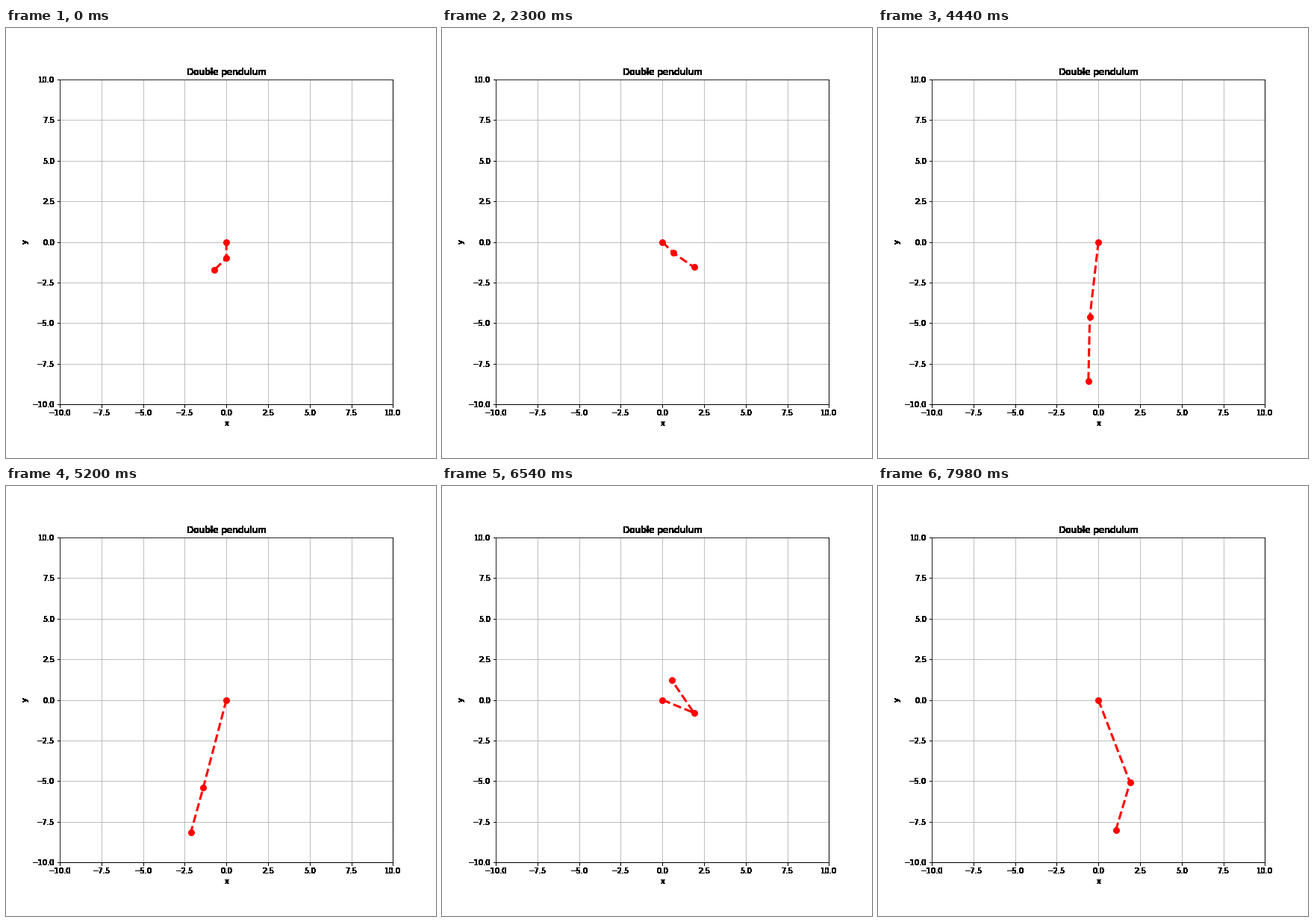
A matplotlib script that plays this animation: 576 by 576 pixels, repeating every 8000 ms.

```python
import math

import matplotlib.pyplot as plt
import numpy as np
from matplotlib.animation import FuncAnimation
from matplotlib.transforms import Bbox

G, K, REST = 9.81, 10.0, 1.0
FRAMES, INTERVAL = 400, 20
DT = 20 / 999
SUBSTEPS = 20


def pull(d):
    """Spring force per unit mass along the complex vector d."""
    length = abs(d)
    return -K * (length - REST) * d / length


def slope(s):
    z1, z2, v1, v2 = s
    f1, f2 = pull(z1), pull(z2 - z1)
    return v1, v2, f1 - f2 - 1j * G, f2 - 1j * G


def shift(s, ds, h):
    return tuple(a + h * b for a, b in zip(s, ds))


def rk4(s, h):
    a = slope(s)
    b = slope(shift(s, a, h / 2))
    c = slope(shift(s, b, h / 2))
    d = slope(shift(s, c, h))
    mean = tuple((p + 2 * q + 2 * r + t) / 6 for p, q, r, t in zip(a, b, c, d))
    return shift(s, mean, h)


def simulate():
    """Two equal masses on springs, both stretching at speed 5 from rest length."""
    u1, u2 = -1j, -(1 + 1j) / math.sqrt(2)
    state = (u1, u1 + u2, 5 * u1, 5 * (u1 + u2))
    path = []
    for _ in range(FRAMES):
        path.append((0, state[0], state[1]))
        for _ in range(SUBSTEPS):
            state = rk4(state, DT / SUBSTEPS)
    return np.array(path)


plt.rcParams.update({"font.family": "DejaVu Sans", "font.size": 10})
fig, ax = plt.subplots(figsize=(8, 8), dpi=72, facecolor=(1, 1, 1, 0))
fig.subplots_adjust(left=0.125, right=0.9, bottom=0.125, top=0.88)
ax.set(xlim=(-10, 10), ylim=(-10, 10), xlabel="x", ylabel="y",
       title="Double pendulum")
ax.grid()

# Dropping the alpha channel gives the lettering its hard, heavy edges.
fig.canvas.draw()
backdrop = np.array(fig.canvas.buffer_rgba())[..., :3].copy()
fig.set_facecolor("white")
fig.figimage(backdrop, zorder=-1)
ax.set_title("")
ax.set_axis_off()

path = simulate()
line, = ax.plot([], [], "ro--", lw=3, markersize=8)
# Stop one pixel short so the frame stays on top of the bobs.
line.set_clip_box(Bbox.from_extents(72, 73, 518, 507))


def draw(i):
    line.set_data(path[i].real, path[i].imag)
    return line,


anim = FuncAnimation(fig, draw, frames=FRAMES, interval=INTERVAL, repeat=True)
plt.show()
```
